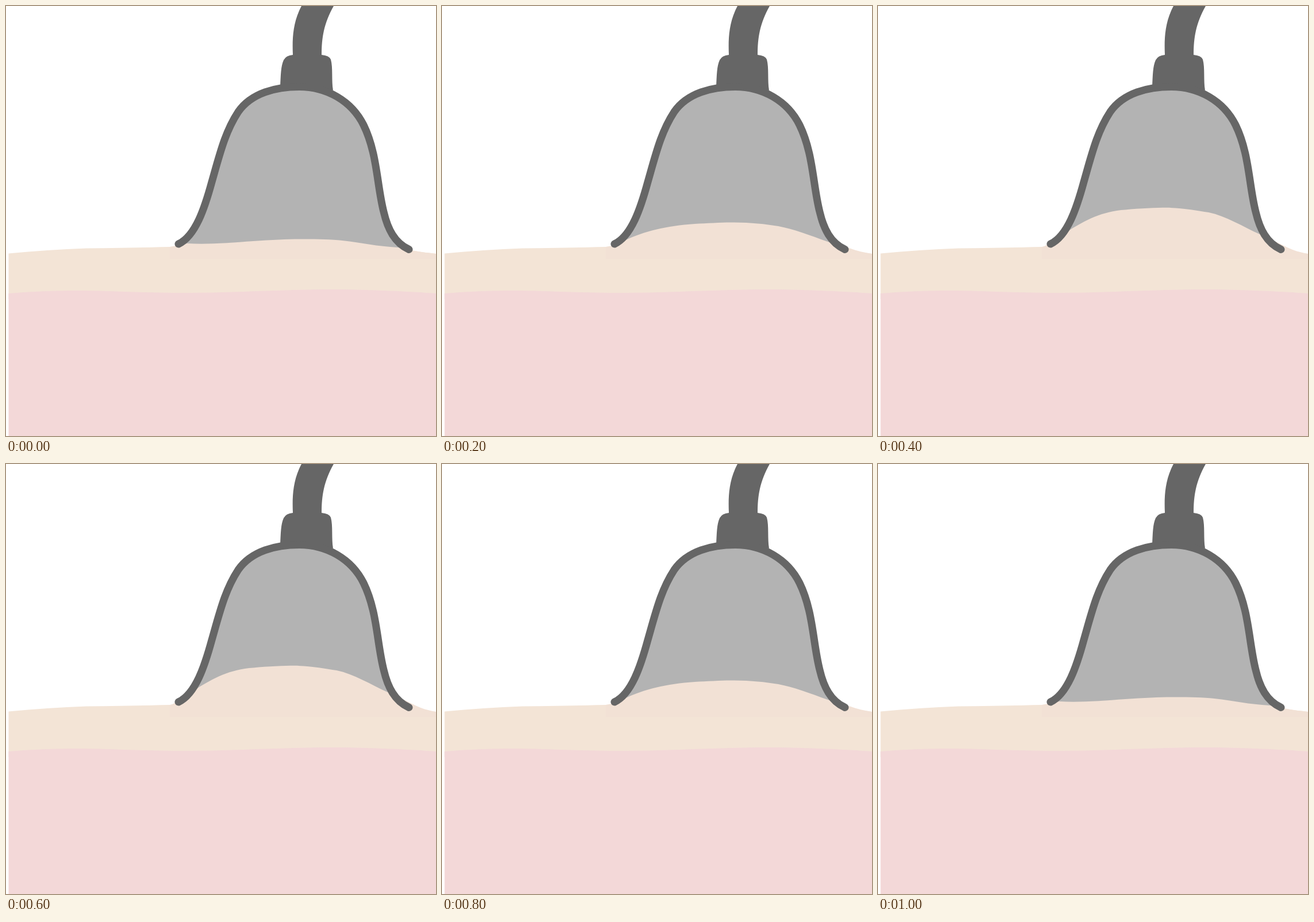
Animation, 748 px wide and 748 px high, one loop 1050 ms. Source, as an HTML page:

```html
<!DOCTYPE html>
<html lang="en">
<head>
<meta charset="utf-8">
<title>Suction cup</title>
<style>
  html, body { margin: 0; width: 100%; height: 100%; overflow: hidden; background: #fff; }
  svg { display: block; width: 100vw; height: 100vh; }

  .air { fill: #b3b3b3; }
  .skin { fill: #f3e4d6; }
  .flesh { fill: #f3d8d8; }
  .neck { fill: #666; }
  .wall { fill: none; stroke: #666; stroke-width: 13; stroke-linecap: round; }

  /* 21 poses of 50 ms: ten up, ten down, then a hold */
  .bump { fill: #f2e1d5; animation: suck 1050ms steps(4, end) infinite; }

  @keyframes suck {
    0%, 95.2381%, 100% {
      d: path("M285 419 C295 418 300 414 316 413 C350 415 390 412 430 409 C465 406.5 495 405.5 515 405.5 C545 405.5 565 406 585 408 C620 412 645 418 681 420 C690 421 698 424 708 425.5 C722 428 735 429.5 748 431 L748 440 L285 440 Z");
    }
    19.0476%, 76.1905% {
      d: path("M285 419 C295 418 300 415 322 406 C350 393 390 382 440 379 C460 378 485 376.5 502 376.5 C535 376.5 560 379 585 383 C612 388 640 399 671 410 C683 414 697 417 708 421 C722 426 735 429 748 431 L748 440 L285 440 Z");
    }
    38.0952%, 57.1429% {
      d: path("M285 419 C295 418 312 402 333 390 C360 373 390 357 430 354.5 C455 352 485 351 502 350.8 C530 351 555 356 575 359 C605 365 635 384 664 397 C680 404 694 411 708 418 C722 425 735 429 748 431 L748 440 L285 440 Z");
    }
    38.0952%, 47.6190% { animation-timing-function: steps(2, end); }
    47.6190% {
      d: path("M285 419 C295 418 316 396 338 382 C365 363 390 344.5 425 342 C452 339 485 338 502 338 C528 338 552 344 570 347 C601 353.5 632 376.5 660 390.5 C678.5 399 692.5 408 708 416.5 C722 424.5 735 429 748 431 L748 440 L285 440 Z");
    }
  }
</style>
</head>
<body>
<svg viewBox="0 0 748 748">
  <defs>
    <path id="bell" d="M300 414 C330 400 346 350 358 306 C372 257 381 219 404 184 C427 151 470 140.5 510 140.5 C558 140.5 601 165 622 207 C646 256 645 311 657 358 C664 388 676 412 701 423.5"/>
  </defs>
  <use href="#bell" class="air"/>
  <path class="skin" d="M4.5 430.5 C50 426.5 95 423 140 421.5 C190 421 240 420 285 419 C300 417 320 414 340 415 C400 415 450 419 500 419 C560 420 620 420.5 681 421.5 L708 425.5 C722 428 735 429.5 748 431 V510 H4.5 Z"/>
  <path class="bump"/>
  <path class="flesh" d="M4.5 500 C50 496 95 495 130 495 C190 495.5 240 499 310 499 C400 499 480 493 570 493 C640 493.5 700 496.5 748 500 V748 H4.5 Z"/>
  <path class="neck" d="M477 140 C478 120 478 105 483 94 Q487 86 499 85 C498 60 498 30 514 0 H570 C553 30 549 55 549 85 Q562 86 565 93 C569 107 566 130 569 147 C550 140 500 138 477 140 Z"/>
  <use href="#bell" class="wall"/>
</svg>
</body>
</html>
```
